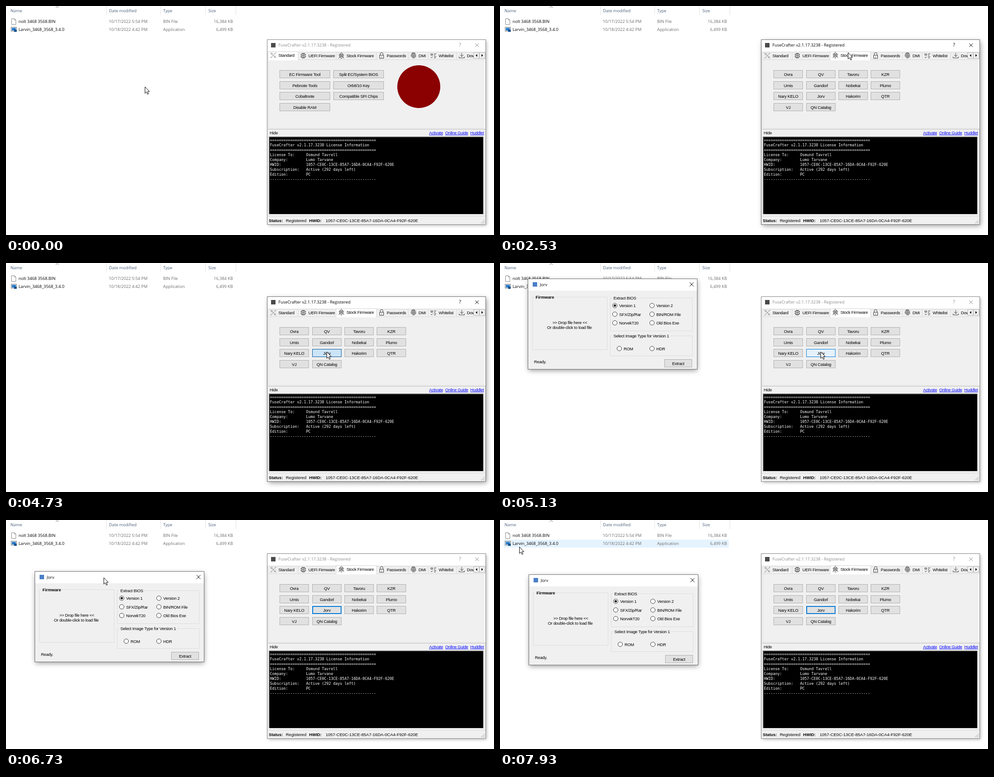
Animation, 1090 px wide and 514 px high, one loop 8000 ms. Source, as an HTML page with a canvas:

```html
<!DOCTYPE html>
<html lang="en">
<head>
<meta charset="utf-8">
<title>Firmware tool walkthrough</title>
<style>
  html, body { margin: 0; width: 100%; height: 100%; overflow: hidden; background: #fff; }
  canvas { display: block; }
</style>
</head>
<body>
<canvas id="stage" width="1090" height="514"></canvas>
<script>
const ctx = document.getElementById('stage').getContext('2d');
const LOOP = 8000, TICK = 1000 / 15;

const UI = '9.3px "Liberation Sans", Arial, sans-serif';
const STATUS = '9.5px "Liberation Sans", Arial, sans-serif';
const BOLD = 'bold 9.3px "Liberation Sans", Arial, sans-serif';
const SHELL = '9.3px "Open Sans", "Noto Sans", sans-serif';
const MONO = '8.38px "DejaVu Sans Mono", "Noto Sans Mono", monospace';
const FACE = '#f0f0f0', BLUE = '#0078d7';

// Tick, x, y; a fourth value of 1 makes the approach linear instead of eased.
const CURSOR = [
  [0, 310, 181], [19, 310, 181], [32, 772, 86], [35, 777, 104, 1], [41, 777, 104],
  [53, 716, 202], [54, 716, 199, 1], [78, 716, 199], [88, 178, 64], [91, 213, 47],
  [92, 213, 45, 1], [93, 213, 45], [94, 214, 53, 1], [96, 216, 80, 1], [99, 217, 115, 1],
  [101, 218, 129, 1], [103, 217, 131, 1], [106, 215, 132, 1], [109, 215, 132], [119, 43, 60]
];
const DIALOG = [
  [73, 63, 35], [93, 63, 35], [94, 63, 38, 1], [96, 64, 58, 1], [98, 64, 85, 1],
  [99, 65, 98, 1], [101, 65, 115, 1], [103, 65, 119, 1], [106, 65, 122, 1]
];

const TABS = [
  { x: 585, w: 67, label: 'Standard', icon: 'M-6-6L6 6M6-6L-6 6M-6-3L-3-6M3 6L6 3M4-6L6-4M-6 4L-4 6M-5-1L-1-5M1 5L5 1', tint: '#777' },
  { x: 652, w: 85, label: 'UEFI Firmware', icon: 'M-4-4H4V4H-4ZM-1.5-1.5H1.5V1.5H-1.5ZM-2-6V-4M0-6V-4M2-6V-4M-2 4V6M0 4V6M2 4V6M-6-2H-4M-6 2H-4M4-2H6M4 2H6' },
  { x: 737, w: 90, label: 'Stock Firmware', icon: 'M-6-1L0-7L6-1M-5 0H-3M3 0H5M-3-3H3V3H-3ZM-1-1H1V1H-1ZM-6 6L-3 3M6 6L3 3M-2 6H2M-5 3H-3M3 3H5' },
  { x: 827, w: 71, label: 'Passwords', icon: 'M-4.5-1H4.5V6H-4.5ZM-3-1V-4A3 3 0 0 1 3-4V-1M0 2V4' },
  { x: 898, w: 45, label: 'DMI', icon: 'M-5 2V-1A5 5 0 0 1 5-1V3M-3 4V-1A3 3 0 0 1 3-1V5M-1 6V-1A1 1 0 0 1 1-1V6M-4-5A6 6 0 0 1 4-5' },
  { x: 943, w: 63, label: 'Whitelist', icon: 'M-6-4H-2V-1H-6ZM-6 3L-4.500 5L-2 2M1-4H6M1-1H4M1 2H6M1 5H5' },
  { x: 1006, w: 60, label: 'Download', icon: 'M0-6V2M-4-2L0 2L4-2M-6 2V5H6V2' }
];
const grid = (cols, w, pitch, labels) => labels.map((label, i) => ({
  label, w, h: 17,
  x: Math.floor(611.8 + (i % cols) * pitch) + 0.5,
  y: Math.floor(144.6 + Math.floor(i / cols) * 24.5) + 0.5
}));
const TOOLS = grid(2, 112, 119.3, ['EC Firmware Tool', 'Split EC/System BIOS', 'Pebnote Tools',
  'Orb8/10 Key', 'Cobaltnote', 'Compatible SPI Chips', 'Disable RAM']);
const VENDORS = grid(4, 64.5, 72.3, ['Ovra', 'QV', 'Tavoru', 'KZR', 'Umis', 'Gandorl', 'Nobekai',
  'Plumo', 'Nary KELO', 'Jorv', 'Hakorim', 'QTR', 'VJ', 'QN Catalog']);
const LICENSE = [
  '='.repeat(47), 'FuseCrafter v2.1.17.3238 License Information', '='.repeat(47),
  'License To:     Osmund Tavrell', 'Company:        Lumo Tarvane',
  'HWID:           1057-CE0C-13CE-85A7-16DA-0CA4-F92F-620E',
  'Subscription:   Active (292 days left)', 'Edition:        PC', '-'.repeat(47)
];

function at(track, k) {
  let i = 0;
  while (i < track.length - 1 && track[i + 1][0] <= k) i++;
  const a = track[i], b = track[i + 1];
  if (!b || k < a[0]) return { x: a[1], y: a[2] };
  let u = (k - a[0]) / (b[0] - a[0]);
  if (!b[3]) u = u * u * (3 - 2 * u);
  return { x: Math.round(a[1] + (b[1] - a[1]) * u), y: Math.round(a[2] + (b[2] - a[2]) * u) };
}
const inside = (p, b) => p.x >= b.x && p.x < b.x + b.w && p.y >= b.y && p.y < b.y + b.h;

function text(s, x, y, color = '#000', font = UI, align = 'left') {
  ctx.font = font;
  ctx.letterSpacing = font === UI ? '-0.25px' : '0px';
  ctx.textAlign = align;
  ctx.fillStyle = color;
  ctx.fillText(s, x, y + 3.4);
}
function rect(x, y, w, h, fill, stroke, width = 1) {
  if (fill) { ctx.fillStyle = fill; ctx.fillRect(x, y, w, h); }
  if (stroke) { ctx.strokeStyle = stroke; ctx.lineWidth = width; ctx.strokeRect(x, y, w, h); }
}
function path(d, x, y, stroke, fill, width = 1) {
  const p = new Path2D(d);
  ctx.save();
  ctx.translate(x, y);
  if (fill) { ctx.fillStyle = fill; ctx.fill(p); }
  if (stroke) { ctx.strokeStyle = stroke; ctx.lineWidth = width; ctx.stroke(p); }
  ctx.restore();
}
function circle(x, y, r, fill, stroke, width = 1) {
  ctx.beginPath();
  ctx.arc(x, y, r, 0, 7);
  if (fill) { ctx.fillStyle = fill; ctx.fill(); }
  if (stroke) { ctx.strokeStyle = stroke; ctx.lineWidth = width; ctx.stroke(); }
}
function frame(x, y, w, h, titleHeight, active, shadowX = 0) {
  ctx.save();
  ctx.shadowColor = `rgba(0,0,0,${active ? 0.4 : 0.3})`;
  ctx.shadowBlur = active ? 11 : 7;
  ctx.shadowOffsetX = shadowX;
  ctx.shadowOffsetY = active ? 3 : 2;
  rect(x, y, w, h, FACE);
  ctx.restore();
  rect(x, y, w, titleHeight, '#fff');
  rect(x, y, w, h, null, active ? '#6a6a6a' : '#858585');
}
function button(b, state = '') {
  const look = {
    hover: ['#e5f1fb', BLUE], press: ['#cce4f7', '#005499'], focus: ['#e1e1e1', BLUE, 2]
  }[state] || ['#e1e1e1', '#adadad'];
  const inset = state === 'focus' ? 0.5 : 0;
  rect(b.x + inset, b.y + inset, b.w - 2 * inset, b.h - 2 * inset, ...look);
  text(b.label, b.x + b.w / 2, b.y + b.h / 2 + 0.5, '#000', UI, 'center');
}

function drawFiles(rowHover) {
  for (const x of [224, 345, 445, 513]) rect(x, 0, 1, 20, '#e2e2e2');
  path('M-3.500 3L0 0L3.500 3', 114.5, 1, '#777');
  const columns = [['Name', 10], ['Date modified', 230], ['Type', 351], ['Size', 452]];
  for (const [label, x] of columns) text(label, x, 11, '#4c607a', SHELL);
  if (rowHover) rect(8, 44, 503, 18, '#e5f3ff');
  const rows = [
    ['nolt 3468 3568.BIN', '10/17/2022 5:54 PM', 'BIN File', '16,384 KB'],
    ['Larvin_3468_3568_3.4.0', '10/18/2022 4:42 PM', 'Application', '6,499 KB']
  ];
  rows.forEach(([name, date, type, size], i) => {
    const y = 35 + i * 18;
    text(name, 28, y, '#000', SHELL);
    text(date, 229.5, y, '#6d6d6d', SHELL);
    text(type, 351, y, '#6d6d6d', SHELL);
    text(size, 507, y, '#6d6d6d', SHELL, 'right');
  });
  path('M0 0H6.500L9.500 3V13H0ZM6.500 0V3H9.500', 12.5, 28.5, '#858585', '#fff');
  rect(11.5, 47.5, 12, 9, '#f6fafd', '#777');
  rect(13, 49, 9, 6, '#2b7ccb');
  rect(18, 53, 6, 5, '#17528f');
}

function drawTab(tab, selected, hover) {
  const top = selected ? 102 : 104;
  rect(tab.x + 0.5, top + 0.5, tab.w, 120 - top, selected ? '#fff' : hover ? '#d8eaf9' : FACE, '#d9d9d9');
  if (selected) rect(tab.x + 1, 119, tab.w - 1, 3, '#fff');
  const y = selected ? 110.5 : 111.5;
  path(tab.icon, tab.x + 12, y, tab.tint || '#222', null, 0.9);
  text(tab.label, tab.x + 23.5, y);
}

function drawTool(k, cursor) {
  const active = k >= 36 && k < 73, selected = k >= 36 ? 2 : 0;
  const ink = active ? '#000' : '#8c8c8c';
  frame(583.5, 75.5, 488, 415, 26, active, 2);
  rect(592, 83, 10, 10, '#4a4a4a');
  text('FuseCrafter v2.1.17.3238 - Registered', 608.5, 88, ink, SHELL);
  text('?', 1014, 88, ink, '11px "Open Sans", sans-serif', 'center');
  path('M-4-4L4 4M4-4L-4 4', 1052, 88, ink);

  rect(586.5, 120.5, 483, 154, FACE, '#dcdcdc');
  rect(1069, 121, 2, 154, '#fff');
  rect(585, 275, 486, 1, '#fff');
  rect(585, 276, 486, 1, '#b4b4b4');
  ctx.save();
  ctx.beginPath();
  ctx.rect(584, 101, 460, 21);
  ctx.clip();
  TABS.forEach((tab, i) => {
    if (i !== selected) drawTab(tab, false, inside(cursor, { x: tab.x, w: tab.w, y: 104, h: 16 }));
  });
  drawTab(TABS[selected], true);
  ctx.restore();
  for (const [x, d] of [[1044.5, 'M2-3V3L-1.500 0Z'], [1057.5, 'M-1.500-3V3L2 0Z']]) {
    rect(x, 104.5, 12.5, 13, FACE, '#b4b4b4');
    path(d, x + 6, 111, null, '#000');
  }

  if (selected === 0) {
    circle(922, 181, 48, '#8b0000');
    TOOLS.forEach(b => button(b, inside(cursor, b) ? 'hover' : ''));
  } else {
    VENDORS.forEach((b, i) => {
      const chosen = i === 9;
      const state = chosen && (k === 71 || k === 72) ? 'press'
        : inside(cursor, b) ? 'hover' : chosen && k >= 73 ? 'focus' : '';
      button(b, state);
    });
  }

  text('Hide', 589, 284.5);
  for (const [label, x] of [['Activate', 945], ['Online Guide', 981], ['Huddlet', 1037]]) {
    text(label, x, 284.5, '#00f');
    rect(x, 289, ctx.measureText(label).width, 1, '#00f');
  }
  // Sunken console: dark upper left edges, light lower right edges.
  rect(587, 293, 480, 175, '#e3e3e3');
  rect(587, 293, 479, 174, '#808080');
  rect(588.5, 294.5, 477.5, 172.5, '#000');
  LICENSE.forEach((line, i) => text(line, 589.5, 300.8 + i * 10.93, '#fff', MONO));

  rect(584, 471, 487, 1, '#d7d7d7');
  text('Status:', 587, 482, '#000', BOLD);
  text('Registered', 625, 482, '#000', STATUS);
  text('HWID:', 677, 482, '#000', BOLD);
  text('1057-CE0C-13CE-85A7-16DA-0CA4-F92F-620E', 714, 482, '#000', STATUS);
  for (let r = 0; r < 3; r++)
    for (let c = 2 - r; c < 3; c++) rect(1061 + c * 3, 480 + r * 3, 1.6, 1.6, '#adadad');
}

function group(label, x, y, w, h, font = UI) {
  rect(x, y, w, h, null, '#dcdcdc');
  ctx.font = font;
  rect(x + 5, y - 4, ctx.measureText(label).width + 3, 8, FACE);
  text(label, x + 7, y + 0.5, '#000', font);
}
function radio(label, x, y, on) {
  circle(x, y, 5.1, '#fff', '#333');
  if (on) circle(x, y, 2.8, '#222');
  text(label, x + 9.8, y + 0.5);
}

function drawDialog(k) {
  const p = at(DIALOG, k);
  const shown = Math.min(1, (k - 72) / 4);
  const scale = 0.9 + 0.1 * shown * (2 - shown);
  ctx.save();
  ctx.globalAlpha = shown;
  ctx.translate(p.x + 189, p.y + 101);
  ctx.scale(scale, scale);
  ctx.translate(-189, -101);
  frame(-0.5, 0.5, 378, 203, 26.5, true);
  rect(10, 8, 10, 10, '#4a7fc8');
  text('Jorv', 26, 13.5, '#000', SHELL);
  path('M-4.500-4.500L4.500 4.500M4.500-4.500L-4.500 4.500', 365, 13, '#000');

  group('Firmware', 9.5, 41.5, 167, 118, BOLD);
  text('>> Drop file here <<', 93, 99, '#000', UI, 'center');
  text('Or double-click to load file', 92, 110, '#000', UI, 'center');

  group('Extract BIOS', 183.5, 43.5, 183, 74);
  const sources = ['Version 1', 'Version 2', 'SFX/Zip/Rar', 'BIN/ROM File', 'NorvekT20', 'Old Bios Exe'];
  sources.forEach((label, i) =>
    radio(label, 193.5 + (i % 2) * 83, 60.5 + Math.floor(i / 2) * 19.4, i === 0));

  group('Select Image Type for Version 1', 183.5, 128.5, 183, 45);
  radio('ROM', 203.5, 157);
  radio('HDR', 276.5, 157);
  text('Ready.', 13, 186.5);
  button({ label: 'Extract', x: 304.5, y: 181.5, w: 61, h: 17 });
  ctx.restore();
}

function draw(now) {
  const k = Math.floor(((now % LOOP) + 5) / TICK) % 120;
  const cursor = at(CURSOR, k);
  rect(0, 0, 1090, 514, '#fff');
  drawFiles(k > 109 && inside(cursor, { x: 8, y: 44, w: 503, h: 18 }));
  drawTool(k, cursor);
  if (k >= 73) drawDialog(k);
  // Pointer locator ring closing in on the cursor.
  if (k >= 57 && k < 62) circle(716, 194, 83 - (k - 57) * 16.5, null, 'rgba(100,100,100,.65)', 2);
  path('M0 0V14.500L3.300 11.400L5.700 16.700L7.900 15.700L5.600 10.500H10Z',
    cursor.x + 0.5, cursor.y + 0.5, '#000', '#fff');
  requestAnimationFrame(() => draw(performance.now() - start));
}
const start = performance.now();
draw(0);
</script>
</body>
</html>
```
